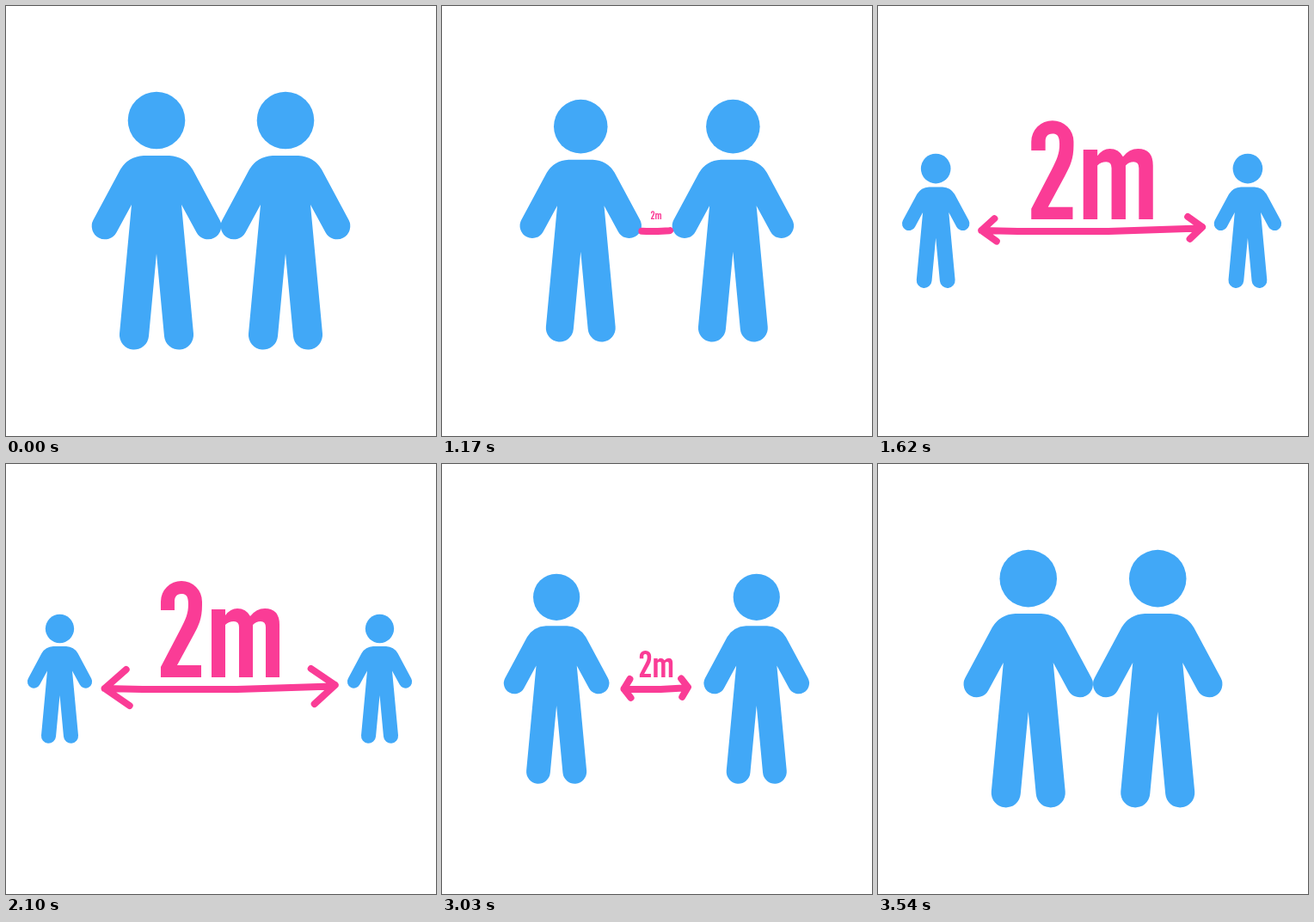
These frames come from a looping animation (500x500 px, 3630 ms). An HTML page with a canvas:

```html
<!DOCTYPE html>
<html lang="en">
<head>
<meta charset="utf-8">
<title>Keep 2m apart</title>
<style>
  html, body { margin: 0; height: 100%; overflow: hidden; background: #fff; }
  canvas { display: block; }
</style>
</head>
<body>
<canvas id="stage" width="500" height="500" role="img" aria-label="Two people keeping 2m apart"></canvas>
<script>
const ctx = document.getElementById('stage').getContext('2d');
const LOOP = 3630, STEP = 30;
const BLUE = '#41a8f7', PINK = '#fa3c96';

const body = new Path2D(
  'M-15-76H15Q33-75 42-60L73.5-1.2A15.3 15.3 0 0 1 46.5 13.2L29-19L43 131' +
  'A17 17 0 0 1 9 134L0 38L-9 134A17 17 0 0 1-43 131L-29-19L-46.5 13.2' +
  'A15.3 15.3 0 0 1-73.5-1.2L-42-60Q-33-75-15-76Z');
const head = new Path2D();
head.arc(0, -117, 33.3, 0, 2 * Math.PI);

// condensed lettering "2m"
const label = new Path2D(
  'M180 170V160A24 24 0 0 1 228 160V164C228 180 224 188 218 199L199 234H227V248H180V236' +
  'L203 192C209 180 212 174 212 163C212 153 209 151 204 151C198 151 196 155 196 160V170Z' +
  'M239 169H255V176Q261 168 269 168Q279 168 284 177Q291 168 301 168Q318 168 318 187V248H302' +
  'V190Q302 183 296 183Q291 183 287 187V248H271V190Q271 183 265 183Q259 183 255 187V248H239Z');

const clamp = u => Math.min(1, Math.max(0, u));
const inOut = (t, start, time) => {
  const u = clamp((t - start) / time);
  return u < .5 ? 4 * u ** 3 : 1 - 4 * (1 - u) ** 3;
};

// 0: together, 1: apart
function spread(t) {
  if (t < 2825) return inOut(t, 870, 960);
  const x = (t - 2825) * .01035;
  return clamp(((1 + x) * Math.exp(-x) - .003) / .997);
}

const shrink = t => 1 - clamp((t - 2550) / 535) ** 3;

function labelScale(t) {
  const overshoot = .06 * Math.exp(-(((t - 1700) / 170) ** 2));
  return t < 2550 ? inOut(t, 938, 830) + (t > 1000 ? overshoot : 0) : shrink(t);
}

function person(x, scale) {
  ctx.save();
  ctx.translate(x, 250);
  ctx.scale(scale, scale);
  ctx.fillStyle = BLUE;
  ctx.fill(body);
  ctx.fill(head);
  ctx.restore();
}

function arrow(sx, sy, barb) {
  const trace = points => points.forEach(([x, y], i) =>
    ctx[i ? 'lineTo' : 'moveTo'](248.7 + x * sx, 262 + y * sy));
  const tip = (x, y, ...ends) => {
    const [a, b] = ends.map(([dx, dy]) => [x + dx * barb, y + dy * barb]);
    trace([a, [x, y], b]);
  };
  ctx.beginPath();
  trace([[-134, -1], [-90, 0], [20, 0], [130, -3.5], [134, -5]]);
  if (barb > 0) {
    tip(-134, -1, [25, -22], [29, 20]);
    tip(134, -5, [-28, -19], [-24, 22]);
  }
  ctx.strokeStyle = PINK;
  ctx.lineWidth = 8;
  ctx.lineCap = ctx.lineJoin = 'round';
  ctx.stroke();
}

function draw(t) {
  ctx.fillStyle = '#fff';
  ctx.fillRect(0, 0, 500, 500);

  const p = spread(t);
  person(175 - 112.5 * p, 1 - p / 2);
  person(325 + 109.5 * p, 1 - p / 2);

  const leaving = t >= 2550;
  const k = leaving ? shrink(t) : p;
  if (k > .01) {
    const sy = leaving ? (1 + 2 * k) / 3 : Math.min(1, 1.5 * k);
    arrow(k, sy, inOut(t, 1390, 420));
  }

  const s = labelScale(t);
  if (s > .005) {
    ctx.save();
    ctx.translate(249, 248);
    ctx.scale(s, s);
    ctx.translate(-249, -248);
    ctx.fillStyle = PINK;
    ctx.fill(label);
    ctx.restore();
  }
}

const start = performance.now();
function tick() {
  const t = (performance.now() - start) % LOOP;
  draw(Math.floor(t / STEP) * STEP);
  requestAnimationFrame(tick);
}
tick();
</script>
</body>
</html>
```
